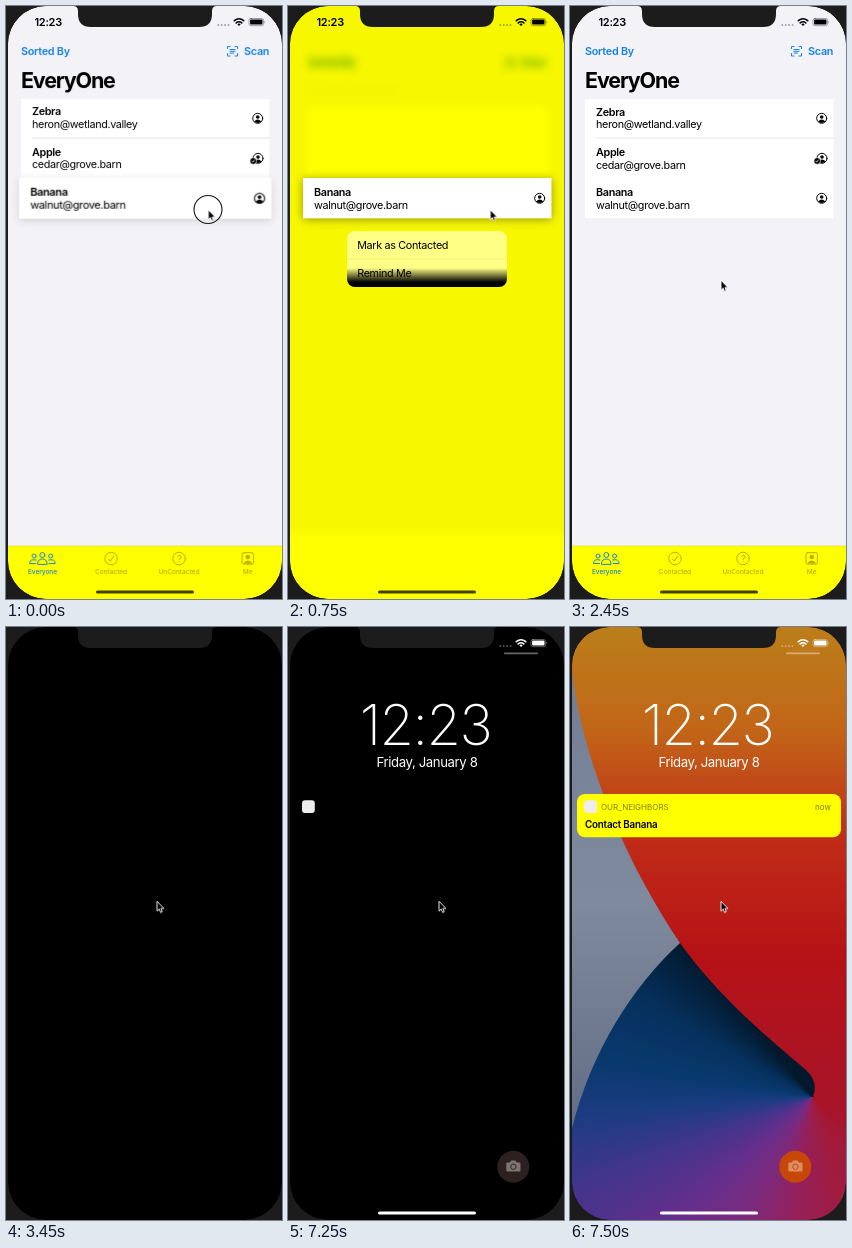
An HTML page that plays this animation: 276 by 593 pixels, repeating every 7.55 s.

```html
<!DOCTYPE html>
<html lang="en">
<head>
<meta charset="utf-8">
<title>Contact reminder</title>
<style>
html, body { margin: 0; width: 100%; height: 100%; overflow: hidden; background: #1c1c1c; }
svg { display: block; width: 100vw; height: 100vh; }
svg * { animation: 7.55s linear infinite; }

text { font: 10.8px Inter, sans-serif; letter-spacing: -.34px; }
.bold { font-weight: 600; }
.nav { font-weight: 600; letter-spacing: -.25px; fill: #1482e6; }
.title { font-size: 21.4px; font-weight: 700; letter-spacing: -1.1px; }
.time { font-size: 11px; font-weight: 600; letter-spacing: -.3px; }
.tab { font-size: 6.5px; font-weight: 500; letter-spacing: 0; text-anchor: middle; }
.clock { font-size: 56px; font-weight: 200; letter-spacing: -1.5px; text-anchor: middle; }
.date { font-size: 13.2px; letter-spacing: -.4px; text-anchor: middle; }
.small { font-size: 8px; letter-spacing: 0; fill: #000; fill-opacity: .5; }
.note { font-size: 9.8px; font-weight: 600; letter-spacing: -.2px; fill: #000; }
.line { fill: none; stroke: currentColor; stroke-linecap: round; stroke-linejoin: round; }

/* Percentages are shares of the 7550 ms loop. */
.page { animation-name: page; transform-origin: 138px 296px; }
@keyframes page {
  0% { transform: none; filter: blur(0) brightness(1); }
  5.3% { transform: scale(.985); filter: blur(2px) brightness(1.01); }
  9.27%, 23.18% { transform: scale(.955); filter: blur(5px) brightness(1.02); }
  24.5% { transform: scale(.967); filter: blur(4.5px) brightness(1.03); }
  27.15%, 100% { transform: none; filter: blur(0) brightness(1); }
}
.ink { animation-name: ink; }
@keyframes ink {
  0% { opacity: 1; }
  5.3% { opacity: .5; }
  8.6% { opacity: .06; }
  10.6%, 24.5% { opacity: 0; }
  27.15%, 100% { opacity: 1; }
}
.tint { animation-name: tint; mix-blend-mode: multiply; }
@keyframes tint {
  0% { opacity: 0; }
  5.3% { opacity: .5; }
  8.6%, 24.5% { opacity: 1; }
  27.15%, 100% { opacity: 0; }
}
.row { animation-name: row; transform-origin: 139px 192px; }
@keyframes row {
  0% { transform: scale(1.016); filter: drop-shadow(0 2px 4px #0002); }
  4% { transform: scale(1.03); filter: drop-shadow(0 2px 5px #0003); }
  7.95%, 24.5% { transform: none; filter: drop-shadow(0 1px 5px #0006); }
  27.15%, 100% { transform: none; filter: drop-shadow(0 0 0 #0000); }
}
.menu { animation-name: menu; transform-origin: 139px 203px; }
@keyframes menu {
  0%, 5.3% { transform: scale(.2); opacity: 0; animation-timing-function: ease-out; }
  9.27%, 23.18% { transform: none; opacity: 1; }
  24.5% { transform: scale(.863); opacity: .8; }
  26.49%, 100% { transform: scale(.4); opacity: 0; }
}
.frost { animation-name: frost; }
@keyframes frost { 0%, 23.18% { opacity: .52; } 24.4%, 100% { opacity: 0; } }
.shade { animation-name: shade; }
@keyframes shade { 0%, 9.95% { opacity: 1; } 12%, 100% { opacity: 0; } }
.pressed { animation: pressed 7.55s step-end infinite; }
@keyframes pressed { 0% { opacity: 0; } 22.5% { opacity: 1; } }
.touch { animation: touch 7.55s step-end infinite; }
@keyframes touch { 0% { opacity: 1; } 7.28% { opacity: 0; } }
.cursor { animation-name: cursor; }
@keyframes cursor {
  0%, 10.4% { transform: translate(202.3px, 203.8px); animation-timing-function: ease-in-out; }
  19.2%, 100% { transform: translate(151px, 274.3px); }
}
.lock { animation: lock 7.55s step-end infinite; }
@keyframes lock { 0% { opacity: 0; } 45.69% { opacity: 1; } }
.wake { animation: wake 7.55s step-end infinite; }
@keyframes wake { 0% { opacity: 0; } 84.76% { opacity: 1; } }
.wallpaper { isolation: isolate; }
.fan {
  width: 276px; height: 593px;
  clip-path: path("M110 316C150 372 200 412 236 443Q249 455 243 469L276 500V593H0V510C18 430 60 362 110 316Z");
  background: conic-gradient(from 90deg at 242px 470px,
    #a8152800 45deg, #a01c40 75deg, #94205c 100deg, #7c2a7c 118deg, #662e8c 138deg,
    #41358c 160deg, #1c3c82 175deg, #08396e 190deg, #06305c 210deg, #03182c 231deg, #03182c 360deg);
}
/* Burning and then multiplying by the same grey subtracts its complement. */
.dim { animation-name: dim; }
.burn { mix-blend-mode: color-burn; }
.multiply { mix-blend-mode: multiply; }
@keyframes dim {
  0%, 95.6% { fill: #000; }
  98.01% { fill: #c7c7c7; }
  99.3%, 100% { fill: #fff; }
}
.reveal { animation-name: reveal; }
@keyframes reveal {
  0%, 96% { transform: translateX(-320px); }
  98.01% { transform: translateX(-220px); }
  99.3%, 100% { transform: none; }
}
.card { animation-name: card; }
@keyframes card { 0%, 98.01% { fill: #e4f41c; } 99.3%, 100% { fill: #ff0; } }
.shutter { animation-name: shutter; }
@keyframes shutter {
  0%, 95.9% { fill: #222; }
  98.01% { fill: #cb0505; }
  99.3%, 100% { fill: #c74708; }
}
</style>
</head>
<body>
<svg viewBox="0 0 276 593" preserveAspectRatio="none">
  <defs>
    <clipPath id="screen"><rect x="2" width="274" height="593" rx="38"/></clipPath>
    <clipPath id="menuShape"><rect x="59" y="225" width="160" height="56" rx="8"/></clipPath>
    <linearGradient id="fadeDown" x2="0" y2="1">
      <stop stop-opacity="0"/><stop offset=".75"/>
    </linearGradient>
    <linearGradient id="fadeRight">
      <stop offset=".976" stop-color="#fff"/><stop offset="1" stop-color="#fff" stop-opacity="0"/>
    </linearGradient>
    <linearGradient id="red" x2="0" y2="1">
      <stop stop-color="#bb7e1a"/><stop offset=".17" stop-color="#c26618"/>
      <stop offset=".36" stop-color="#c02c17"/><stop offset=".55" stop-color="#b61216"/>
      <stop offset=".8" stop-color="#a81428"/><stop offset="1" stop-color="#982048"/>
    </linearGradient>
    <linearGradient id="grey" x2="0" y2="1">
      <stop stop-color="#727d94"/><stop offset=".5" stop-color="#808a9f"/><stop offset="1" stop-color="#606a80"/>
    </linearGradient>
    <mask id="reveal" maskUnits="userSpaceOnUse" x="0" y="160" width="276" height="60">
      <rect class="reveal" x="-300" y="160" width="615" height="60" fill="url(#fadeRight)"/>
    </mask>

    <g id="person">
      <circle class="line" r="5" stroke-width="1"/>
      <circle cy="-1.3" r="1.8" fill="currentColor"/>
      <path d="M-3.6 3.2Q0-.8 3.6 3.2Q0 6 -3.6 3.2Z" fill="currentColor"/>
    </g>
    <g id="status">
      <path d="M211.5 19h12" stroke="currentColor" stroke-width="1.4" stroke-dasharray="1.6 1.8" opacity=".4"/>
      <g class="line" stroke-width="1.6" stroke-linecap="butt">
        <path d="M228.3 14.7Q233 10.8 237.7 14.7M230.2 16.9Q233 14.6 235.8 16.9"/>
      </g>
      <path d="M231.3 18.2Q233 16.9 234.7 18.2L233 20Z" fill="currentColor"/>
      <rect class="line" x="243" y="12.5" width="14.6" height="7.2" rx="2" stroke-width=".7" opacity=".5"/>
      <rect x="244.1" y="13.6" width="12.4" height="5" rx="1.1" fill="currentColor"/>
      <path d="M258.6 14.8q1.3 1.3 0 2.6z" fill="currentColor" opacity=".6"/>
    </g>
    <rect id="home" x="90" y="584.4" width="98" height="3.2" rx="1.6" fill="currentColor"/>
  </defs>

  <g clip-path="url(#screen)">
    <rect width="276" height="593" fill="#f2f2f7"/>
    <g class="page">
      <rect x="-60" y="-60" width="396" height="720" fill="#f2f2f7"/>
      <text class="nav" x="15" y="49">Sorted By</text>
      <text class="nav" x="238" y="49">Scan</text>
      <path class="line" color="#1482e6" d="M221.5 42.5v-2h2.5M229 40.5h2.5v2M231.5 47.5v2.5h-2.5M224 50h-2.5v-2.5M224 43.5h5M224 45.3h5M224 47.1h3.5"/>
      <rect x="15" y="93" width="248.5" height="79" fill="#fff"/>
      <g class="ink">
        <text class="title" x="15" y="82">EveryOne</text>
        <path d="M26 132H263.5" stroke="#dcdce0" stroke-width=".7"/>
        <text class="bold" x="26" y="109.5">Zebra</text>
        <text x="26" y="122.3">heron@wetland.valley</text>
        <text class="bold" x="26" y="149.7">Apple</text>
        <text x="26" y="162.5">cedar@grove.barn</text>
        <use href="#person" x="251.7" y="112.3"/>
        <use href="#person" x="252" y="152.3"/>
        <circle cx="247.2" cy="155" r="3.3" stroke="#fff" stroke-width=".6"/>
        <path class="line" color="#fff" d="M245.8 155.1l1 1.1 1.7-2.3" stroke-width=".7"/>
      </g>
      <rect x="-60" y="540" width="396" height="140" fill="#ff0"/>
      <g class="ink">
        <path d="M0 540H276" stroke="#d6d600" stroke-width=".5"/>
        <g class="line" color="#1c86c8">
          <circle cx="36.3" cy="549" r="2.5"/><circle cx="28" cy="550" r="2"/><circle cx="44.6" cy="550" r="2"/>
          <path d="M31.5 558Q31.5 553 36.3 553T41.1 558ZM30 554Q23.5 552.5 23.5 557.5H29.5M42.6 554Q49.1 552.5 49.1 557.5H43.1"/>
        </g>
        <text class="tab" x="36.5" y="568.2" fill="#1c86c8">Everyone</text>
        <g color="#b5b000" fill="#b5b000">
          <circle class="line" cx="105" cy="552.5" r="6.3"/>
          <path class="line" d="M102.5 553l1.8 2.2 3.4-5.2"/>
          <text class="tab" x="105" y="568.2">Contacted</text>
          <circle class="line" cx="173" cy="552.5" r="6.3"/>
          <text x="173.2" y="555.9" text-anchor="middle" style="font-size:9.5px">?</text>
          <text class="tab" x="173" y="568.2">UnContacted</text>
          <rect class="line" x="236" y="546.7" width="11.4" height="11.4" rx="1.5"/>
          <circle cx="241.7" cy="551" r="2.2"/>
          <path d="M237 557.5Q241.7 551.5 246.4 557.5Z"/>
          <text class="tab" x="241.7" y="568.2">Me</text>
        </g>
      </g>
    </g>
    <rect class="tint" width="276" height="593" fill="#ff0"/>

    <g class="row">
      <rect x="15" y="172" width="248.5" height="40.3" fill="#fff"/>
      <text class="bold" x="26" y="189.8">Banana</text>
      <text x="26" y="202.6">walnut@grove.barn</text>
      <use href="#person" x="251.7" y="192.3"/>
    </g>

    <g class="menu">
      <g clip-path="url(#menuShape)">
        <rect x="59" y="225" width="160" height="56" fill="#ff0"/>
        <rect class="frost" x="59" y="225" width="160" height="56" fill="#fff"/>
        <rect class="pressed" x="59" y="253" width="160" height="28" fill-opacity=".04"/>
        <path d="M59 253H219" stroke="#000" stroke-opacity=".1" stroke-width=".6"/>
        <rect class="shade" x="59" y="262" width="160" height="19" fill="url(#fadeDown)"/>
      </g>
      <text x="69.2" y="243">Mark as Contacted</text>
      <text x="69.2" y="271.2">Remind Me</text>
    </g>

    <text class="time" x="28.5" y="20.3">12:23</text>
    <use href="#status"/>
    <use href="#home" opacity=".75"/>

    <g class="lock" color="#fff" fill="#fff">
      <rect width="276" height="593" fill="#000"/>
      <g class="wallpaper">
        <rect width="276" height="593" fill="url(#red)"/>
        <path d="M0 30L2 45C12 130 55 235 110 316L90 520H0Z" fill="url(#grey)"/>
        <foreignObject width="276" height="593"><div class="fan"></div></foreignObject>
        <rect class="dim burn" width="276" height="593"/>
        <rect class="dim multiply" width="276" height="593"/>
      </g>
      <g class="wake">
        <use href="#status"/>
        <rect x="216" y="25.5" width="34" height="1.7" rx=".8" opacity=".4"/>
        <text class="clock" x="137.5" y="117.6">12:23</text>
        <text class="date" x="139" y="140.3">Friday, January 8</text>
        <g mask="url(#reveal)">
          <rect class="card" x="7" y="167" width="264" height="43.3" rx="8"/>
          <text class="small" x="31" y="183">OUR_NEIGHBORS</text>
          <text class="small" x="261" y="183" text-anchor="end">now</text>
          <text class="note" x="15" y="200.7">Contact Banana</text>
        </g>
        <rect x="14" y="173.3" width="12.8" height="12.8" rx="3" fill="#ededed"/>
        <circle class="shutter" cx="225.3" cy="539.7" r="16"/>
        <g opacity=".38">
          <path fill-rule="evenodd" d="M219.5 535.5h2.5l1.2-1.9h4.4l1.2 1.9h2.5q1.2 0 1.2 1.2v6.6q0 1.2-1.2 1.2h-11.8q-1.2 0-1.2-1.2v-6.6q0-1.2 1.2-1.2zM225.4 536.6a3.1 3.1 0 1 0 .01 0z"/>
          <circle cx="225.4" cy="539.7" r="2.2"/>
        </g>
        <use href="#home"/>
      </g>
    </g>
  </g>

  <path fill="#1c1c1c" fill-rule="evenodd" d="M0 0H276V593H0ZM40 0A38 38 0 0 0 2 38V555A38 38 0 0 0 40 593H238A38 38 0 0 0 276 555V38A38 38 0 0 0 238 0Z"/>
  <path fill="#1c1c1c" d="M67 0Q72 0 72 5V8Q72 21 85 21H193Q206 21 206 8V5Q206 0 211 0Z"/>

  <circle class="touch" cx="202" cy="203.5" r="14" fill="#fff" fill-opacity=".3" stroke="#111" stroke-width="1.1"/>
  <path class="cursor" d="M0 0V9.8L2.2 7.8 3.6 11.2 5.3 10.5 3.9 7.2H6.9Z" stroke="#fff" stroke-width=".9" stroke-linejoin="round"/>
</svg>
</body>
</html>
```
